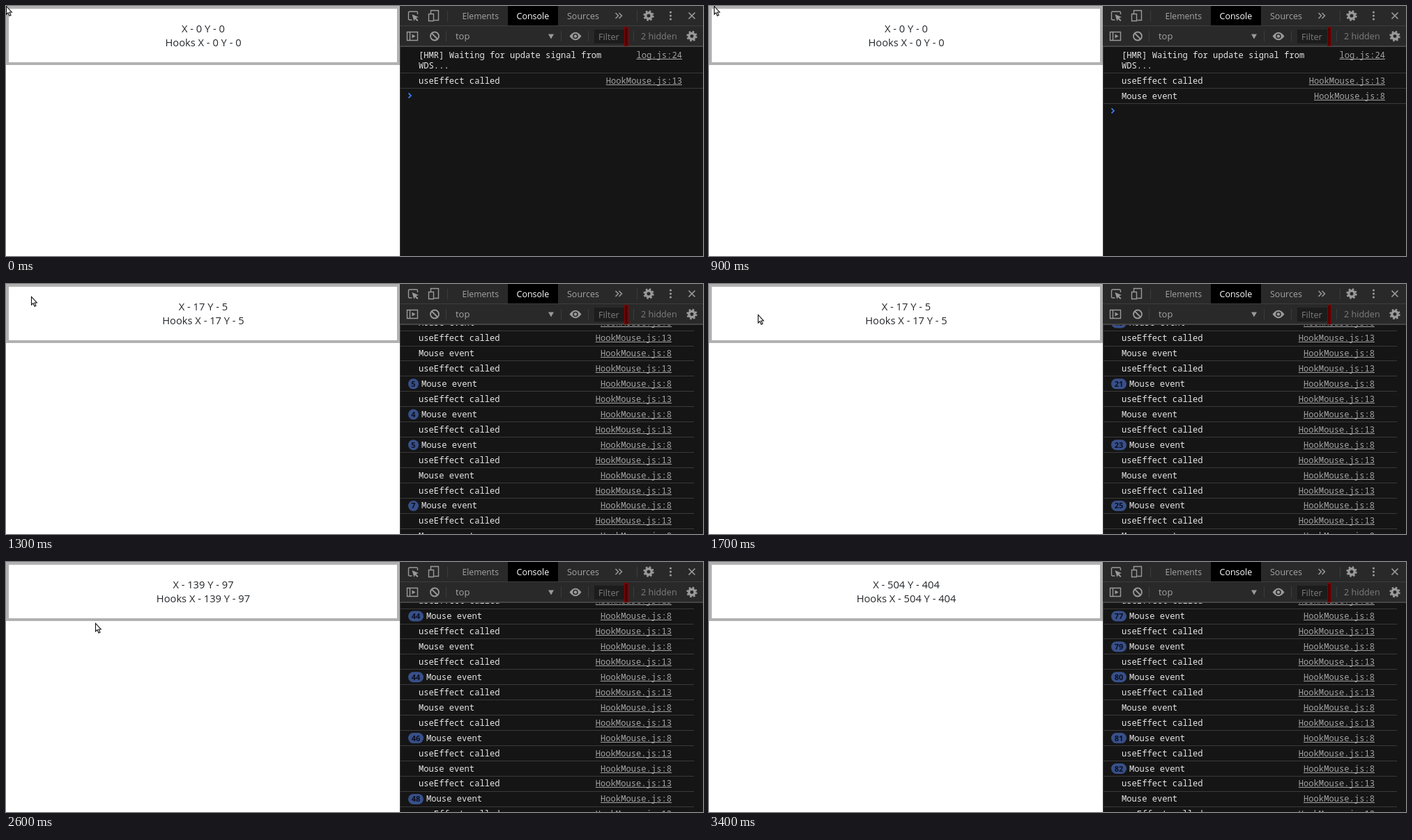
An HTML page with a canvas for the animation above (3800 ms loop, 1000x360 px).

```html
<!DOCTYPE html>
<html lang="en">
<head>
<meta charset="utf-8">
<title>Mouse position logger</title>
<style>
  html, body { margin: 0; overflow: hidden; background: #fff; }
  canvas { display: block; }
</style>
</head>
<body>
<canvas id="stage" width="1000" height="360"></canvas>
<script>
const c = document.getElementById('stage').getContext('2d');
const LOOP = 3800, STEP = 100, ROW = 21.95;
const UI = '"Open Sans", "Noto Sans", sans-serif';
const MONO = '12.15px "Noto Sans Mono", "DejaVu Sans Mono", monospace';
const ICON = '#9a9a9a';

// Tracks: [time, ...values], linear in between
const cursorTrack = [[0, 0, 0], [899, 0, 0], [900, 7, 0], [1000, 10, 0], [1200, 22, 7], [1400, 49, 28],
  [1700, 70, 44], [2000, 90, 61], [2100, 97, 66], [2600, 128, 88], [2700, 133, 92], [2800, 146, 103],
  [2900, 175, 127], [3000, 228, 171], [3100, 300, 230], [3200, 375, 292], [3300, 464, 366]];
const countTrack = [[0, 0, 0], [1000, 0, 0], [1200, 13, 3], [1300, 17, 5], [1700, 17, 5], [2000, 92, 63],
  [2100, 104, 72], [2600, 139, 97], [2800, 159, 114], [3000, 248, 189], [3200, 408, 322], [3300, 504, 404]];
const rowTrack = [[0, 0], [899, 0], [900, 1], [1000, 3], [1200, 11]];
const scrollTrack = [[1300, 5], [1700, 41], [2100, 92], [2600, 92], [2700, 98], [3200, 148], [3300, 162]];

// How often each "Mouse event" line repeats
const repeats = [2, 1, 1, 1, 5, 4];
for (let n = 5; n <= 43; n += 2) repeats.push(n, 1);
repeats.push(44, 1);
for (let n = 44; n <= 68; n += 2) repeats.push(n, 1);
repeats.push(70, 72, 73, 1, 74, 75, 1, 77, 79, 80, 1, 81, 82, 1);

function sample(track, t) {
  const i = track.findIndex(k => k[0] > t);
  if (i < 0) return track[track.length - 1].slice(1);
  if (i === 0) return track[0].slice(1);
  const a = track[i - 1], b = track[i], f = (t - a[0]) / (b[0] - a[0]);
  return a.slice(1).map((v, j) => Math.round(v + (b[j + 1] - v) * f));
}

function rect(x, y, w, h, color) {
  c.fillStyle = color;
  c.fillRect(x, y, w, h);
}

function text(str, x, y, font, color, align = 'left') {
  c.font = font;
  c.fillStyle = color;
  c.textAlign = align;
  c.fillText(str, x, y);
}

function shape(d, x, y, fill, stroke, width = 1.4) {
  const path = new Path2D(d);
  c.save();
  c.translate(x, y);
  if (fill) { c.fillStyle = fill; c.fill(path); }
  if (stroke) { c.strokeStyle = stroke; c.lineWidth = width; c.stroke(path); }
  c.restore();
}

function ring(x, y, r, width, dash = []) {
  c.strokeStyle = ICON;
  c.lineWidth = width;
  c.setLineDash(dash);
  c.beginPath();
  c.arc(x, y, r, 0, 7);
  c.stroke();
  c.setLineDash([]);
}

function dot(x, y, r, color = ICON) {
  c.fillStyle = color;
  c.beginPath();
  c.arc(x, y, r, 0, 7);
  c.fill();
}

function gear(x, y) {
  const tooth = Math.PI * 6.4 / 8;
  ring(x, y, 4.2, 3.4);
  ring(x, y, 6.4, 2.6, [tooth, tooth]);
}

function drawPage([x, y]) {
  rect(0, 0, 1000, 360, '#fff');
  rect(0, 0, 565, 85, '#b1b1b1');
  rect(4, 4, 557, 77, '#fff');
  const font = '14.7px ' + UI, label = `X - ${x} Y - ${y}`;
  text(label, 283, 38, font, '#24272b', 'center');
  text('Hooks ' + label, 283, 58, font, '#24272b', 'center');
}

function drawToolbar() {
  rect(565, 0, 435, 58, '#292929');
  rect(565, 28, 435, 1, '#3d3d3d');
  rect(565, 57, 435, 2, '#454545');
  rect(720, 0, 72, 28, '#000');
  for (const [x, y] of [[633, 7], [905, 7], [631, 36], [796, 36], [835, 36], [900, 36]]) rect(x, y, 1, 15, '#3d3d3d');

  shape('M5 12H1.5Q0 12 0 10.500V1.500Q0 0 1.500 0H11.500Q13 0 13 1.500V4', 577.5, 8, null, ICON);
  shape('M5 4L14.500 8L10.800 9.300L14 12.600L12.600 14L9.300 10.700L8 14Z', 577.5, 8, ICON);
  shape('M3 5V0H14V14H8M0 5H7V15H0Z', 606.5, 6.500, null, ICON);
  shape('M0 0H15V12H0ZM4 0V12', 575.5, 37.5, null, ICON);
  shape('M7 3L12 6L7 9Z', 575.5, 37.5, ICON);
  ring(615, 43.5, 6, 1.8);
  shape('M-4 -4L4 4', 615, 43.5, null, ICON, 1.8);
  shape('M-4 -3H4L0 4Z', 782, 43.5, ICON);
  shape('M-8.500 0Q0 -11.500 8.500 0Q0 11.500 -8.500 0Z', 817, 43.5, ICON);
  dot(817, 43.5, 3.8, '#292929');
  dot(817, 43.5, 2.2);
  gear(922, 14);
  gear(984, 43.5);
  for (const y of [9, 14, 19]) dot(953.5, y, 1.6);
  shape('M-4.500 -4.500L4.500 4.500M4.500 -4.500L-4.500 4.500', 984, 14, null, ICON, 1.7);
  shape('M-4.500 -4L-.5 0L-4.500 4M.5 -4L4.500 0L.5 4', 879, 14, null, ICON, 1.5);

  const font = '12.5px ' + UI;
  text('Elements', 654.5, 19, '12.2px ' + UI, '#a5a5a5');
  text('Console', 732.5, 19, font, '#fff');
  text('Sources', 805, 19, font, '#a5a5a5');
  text('top', 645, 48, '13px ' + UI, '#a5a5a5');
  rect(844, 34, 43, 20, '#1c1c1c');
  text('Filter', 850, 49, '12.7px ' + UI, '#7d7d7d');
  rect(887, 30, 6, 28, '#8b0000');
  rect(888, 31, 4, 26, '#520000');
  text('2 hidden', 911, 48, '12.6px ' + UI, '#7d7d7d');
}

function drawRow(y, message, link, count, scrolled) {
  const right = scrolled ? 955 : 970;
  let x = 592;
  if (count > 1) {
    const w = count > 9 ? 22 : 15;
    c.fillStyle = '#38508a';
    c.beginPath();
    c.roundRect(577, y - 7.5, w, 15, 7.5);
    c.fill();
    text(count, 577 + w / 2, y + 4, 'bold 11px ' + UI, '#0b1020', 'center');
    x = 577 + w + 4;
  }
  text(message, x, y + 4, MONO, '#e6e6e6');
  text(link, right, y + 4, MONO, '#a3a3a3', 'right');
  const w = c.measureText(link).width;
  rect(right - w, Math.round(y + 5), w, 1, '#a3a3a3');
  rect(566, Math.round(y + 10.5), scrolled ? 421 : 434, 1, '#3a3a3a');
}

function drawLogRow(row, y, count, scrolled) {
  if (row % 2) drawRow(y, 'useEffect called', 'HookMouse.js:13', 1, scrolled);
  else drawRow(y, 'Mouse event', 'HookMouse.js:8', count, scrolled);
}

function drawConsole(t) {
  rect(565, 0, 435, 360, '#151515');
  if (t >= 1300) {
    const [top] = sample(scrollTrack, t);
    for (let k = -1; k < 14; k++) {
      const row = top + k;
      drawLogRow(row, 78 + k * ROW, repeats[row >> 1], true);
    }
  } else {
    drawRow(71, '[HMR] Waiting for update signal from', 'log.js:24', 1, false);
    rect(566, 81, 434, 2, '#151515');
    text('WDS...', 592, 90, MONO, '#e6e6e6');
    rect(566, 96, 434, 1, '#3a3a3a');
    drawRow(107.6, 'useEffect called', 'HookMouse.js:13', 1, false);
    const [rows] = sample(rowTrack, t);
    for (let row = 0; row < rows; row++) {
      drawLogRow(row, 129.6 + row * ROW, rows > 1 ? repeats[row >> 1] : 1, false);
    }
    shape('M-2 -3.500L1.500 0L-2 3.500', 579.5, 129 + rows * ROW, null, '#3b78e7', 1.8);
  }
  rect(565, 58, 1, 302, '#3d3d3d');
}

function draw(t) {
  drawPage(sample(countTrack, t));
  drawConsole(t);
  drawToolbar();
  const [x, y] = sample(cursorTrack, t);
  shape('M.5 .5V12L3 9.700L5 14.200L7 13.300L5 9H8.300Z', x, y, '#fff', '#111', 1.1);
}

function tick() {
  const t = performance.now() % LOOP;
  draw(Math.floor(t / STEP) * STEP);
  requestAnimationFrame(tick);
}
tick();
</script>
</body>
</html>
```
